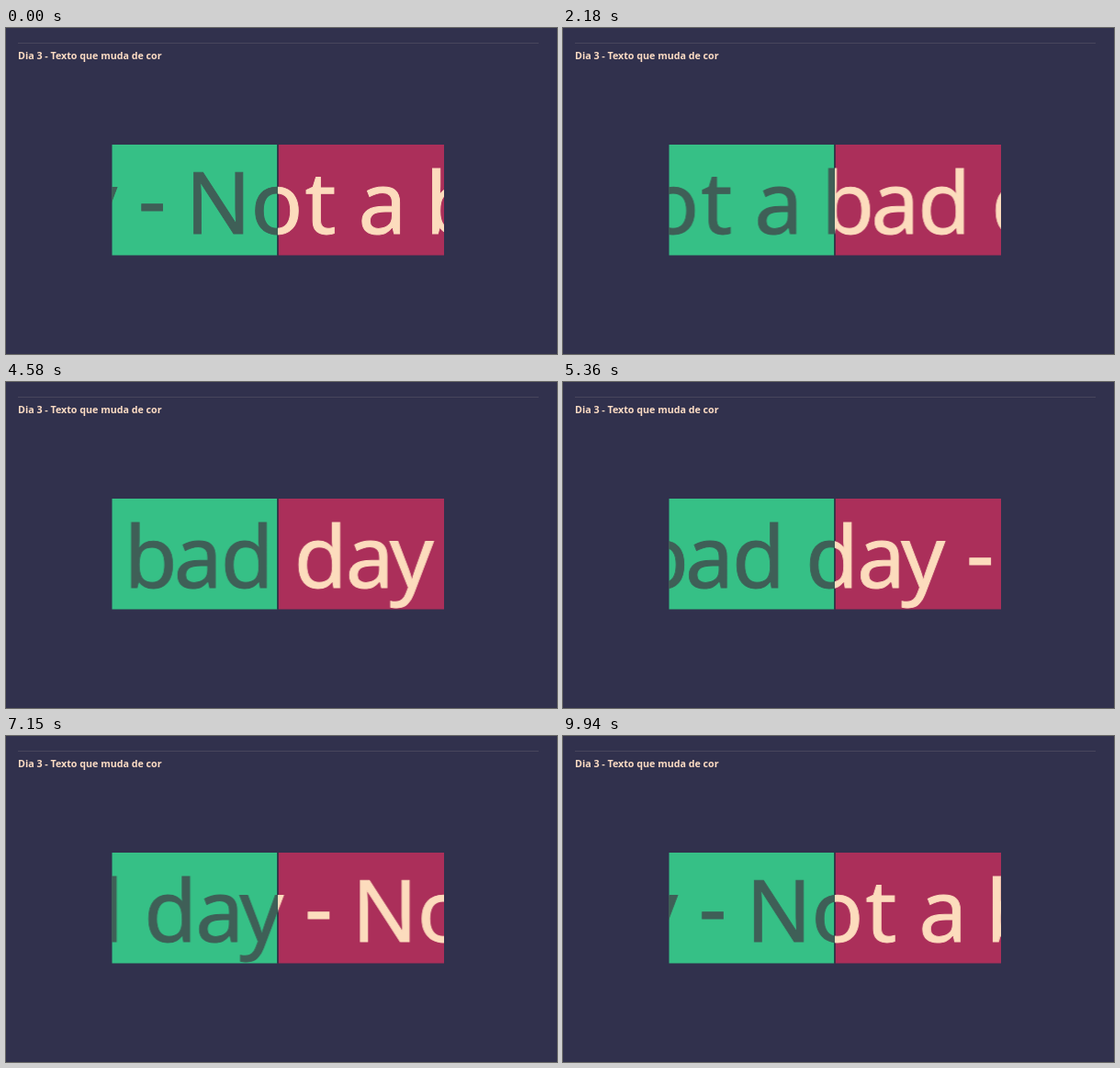
An HTML page for the animation above (10 s loop, 600 by 355 pixels).

```html
<!DOCTYPE html>
<html lang="pt">
<head>
<meta charset="utf-8">
<title>Texto que muda de cor</title>
<style>
  html, body { margin: 0; width: 100%; height: 100%; overflow: hidden; background: #31314d; }
  svg { display: block; width: 100%; height: 100%; }
  text { font-family: "Noto Sans", "Open Sans", sans-serif; }
  .title { font-size: 10.7px; font-weight: 700; fill: #fcdcc4; }
  .phrase { font-size: 94px; stroke-width: .9px; }
  .left { fill: #3f5f57; stroke: #3f5f57; }
  .right { fill: #fcdcbd; stroke: #fcdcbd; }
  .run { animation: slide 10s linear -9.324s infinite; }
  @keyframes slide {
    from { transform: translateX(125px); }
    to { transform: translateX(-511px); }
  }
</style>
</head>
<body>
<svg viewBox="0 0 600 355">
  <defs>
    <clipPath id="leftHalf"><rect x="115.5" y="127" width="179.9" height="120.5"/></clipPath>
    <clipPath id="rightHalf"><rect x="296.5" y="127" width="180.5" height="120.5"/></clipPath>
    <!-- one x per character, spaces included -->
    <text id="phrase" class="phrase" y="223.5"
      x="-9 62 121 150 179 230 252 306 357 415 437 493 541 588 612">Not a bad day <tspan dy="-4">-</tspan></text>
    <g id="line">
      <use href="#phrase"/>
      <use href="#phrase" x="672.5"/>
    </g>
  </defs>

  <rect width="600" height="355" fill="#31314d"/>
  <rect x="13" y="16" width="567" height="1" fill="#48465c"/>
  <text class="title" x="13" y="34">Dia 3 - Texto que muda de cor</text>

  <rect x="115.5" y="127" width="179.9" height="120.5" fill="#36c086"/>
  <rect x="296.5" y="127" width="180.5" height="120.5" fill="#ab2f5a"/>
  <rect x="295.4" y="127" width="1.1" height="120.5" fill="#25283a"/>
  <g class="left" clip-path="url(#leftHalf)"><g class="run"><use href="#line"/></g></g>
  <g class="right" clip-path="url(#rightHalf)"><g class="run"><use href="#line"/></g></g>
</svg>
</body>
</html>
```
